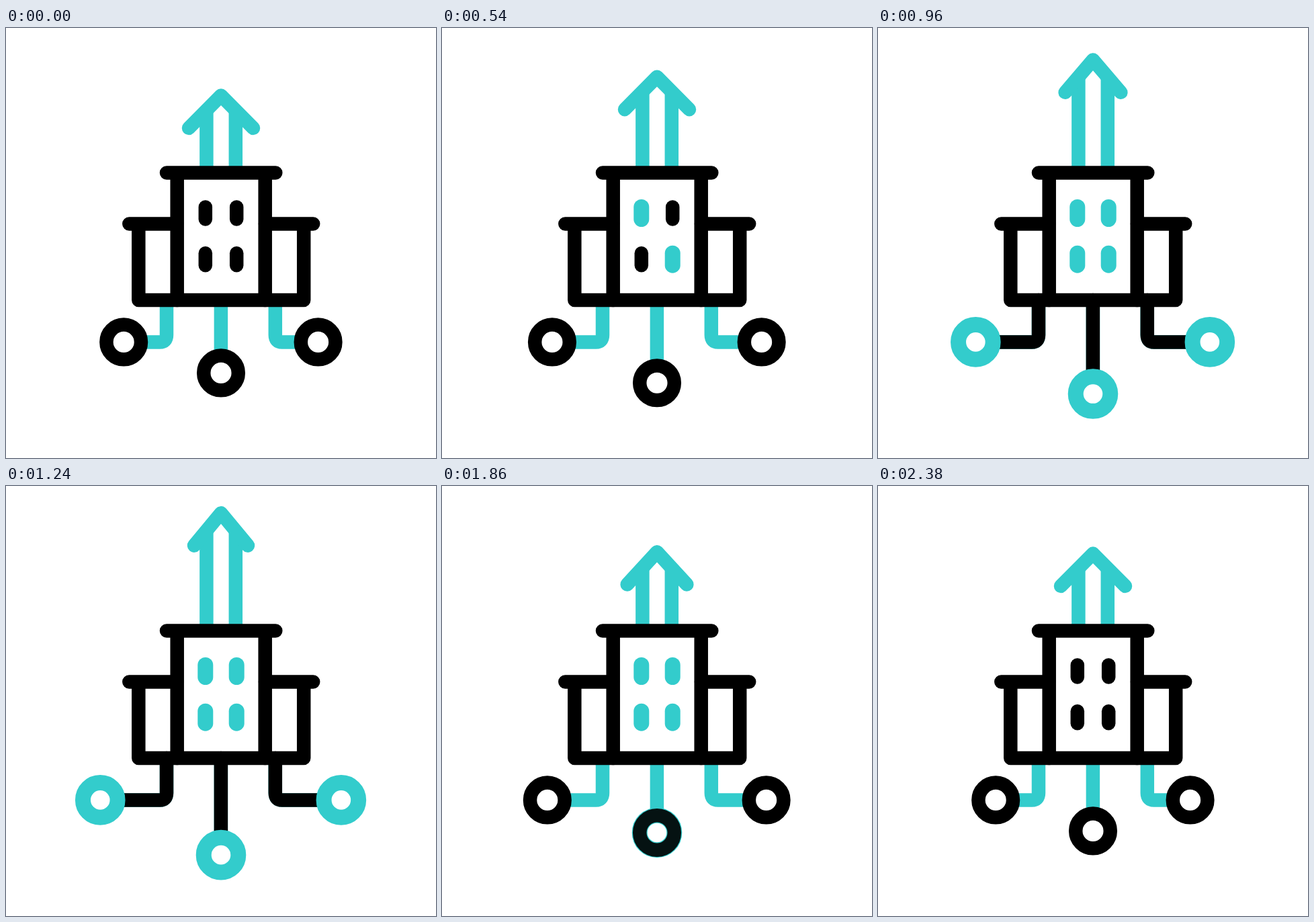
Recreate the animation shown at these times as an HTML page with a canvas. Size 640 by 640 pixels, loop 2.8 s.

```html
<!DOCTYPE html>
<html lang="en">
<head>
<meta charset="utf-8">
<title>Growing building</title>
<style>
html, body { margin: 0; width: 100%; height: 100%; overflow: hidden; background: #fff; }
canvas { display: block; width: 640px; height: 640px; }
</style>
</head>
<body>
<canvas id="stage" width="640" height="640"></canvas>
<script>
const ctx = document.getElementById('stage').getContext('2d');
const LOOP = 2800, REST = 2380, TEAL = '#33cccc', BLACK = '#000', WIDTH = 20.5;

const ramp = (t, from, to) => Math.min(1, Math.max(0, (t - from) / (to - from)));
const ease = (t, from, to) => (1 - Math.cos(Math.PI * ramp(t, from, to))) / 2;

// Soft rise, then a fall just past rest, one rebound and a settle
function stretch(t, power, time, fall, low) {
  const rise = 1 - Math.exp(-((t / time) ** power));
  const top = low + 180;
  return rise - 1.03 * ease(t, fall, low) + 0.243 * ease(t, low, top) - 0.213 * ease(t, top, REST);
}

function stroke(path, color, width = WIDTH, cap = 'round') {
  ctx.strokeStyle = color;
  ctx.lineWidth = width;
  ctx.lineCap = cap;
  ctx.lineJoin = 'round';
  ctx.stroke(new Path2D(path));
}

function drawArrow(t) {
  const tip = 100.6 - 63.3 * stretch(t, 2, 712, 1641, 1905);
  const half = 48 - 8 * (ease(t, 540, 1120) - Math.sqrt(ramp(t, 1640, REST)));
  stroke(`M298.4 ${tip + 24}V215M341.8 ${tip + 24}V215`, TEAL, WIDTH, 'butt');
  stroke(`M${320 - half} ${tip + 48.3}L320 ${tip}L${320 + half} ${tip + 48.3}`, TEAL);
}

function drawPipe(path, length, t) {
  stroke(path, TEAL, WIDTH, 'butt');
  const start = length * ramp(t, 1634, 1834), end = length * ramp(t, 560, 860);
  if (end <= start) return;
  ctx.setLineDash([end - start, 2 * length]);
  ctx.lineDashOffset = -start;
  stroke(path, BLACK);
  ctx.setLineDash([]);
}

function drawNode(x, y, dark) {
  const circle = new Path2D();
  circle.arc(x, y, 25.8, 0, 2 * Math.PI);
  ctx.fillStyle = '#fff';
  ctx.fill(circle);
  if (dark < 1) stroke(circle, TEAL, 23);
  ctx.globalAlpha = dark;
  stroke(circle, BLACK);
  ctx.globalAlpha = 1;
}

function drawSide(t, spread, dark) {
  const x = 175.2 - spread;
  drawPipe(`M239 405V457Q239 467.4 229 467.4H${x}`, 121.8 + spread, t);
  drawNode(x, 467.4, dark);
}

function drawBranches(t) {
  const spread = 36 * stretch(t, 2.7, 778, 1712, 2020);
  const y = 513.4 + 37.3 * stretch(t, 2.2, 735, 1585, 1930);
  const darkness = begin => 1 - ramp(t, 780, 900) + ramp(t, begin, begin + 190);
  drawSide(t, spread, darkness(1661));
  ctx.save();
  ctx.translate(639.8, 0);
  ctx.scale(-1, 1);
  drawSide(t, spread * 0.98, darkness(1661));
  ctx.restore();
  drawPipe(`M319.9 405V${y}`, y - 405, t);
  drawNode(320, y, darkness(1688));
}

function drawWindow(x, y, lit) {
  stroke(`M${x} ${y - 9}V${y + 9}`, lit ? TEAL : BLACK, lit ? 23 : WIDTH);
}

function drawBuilding(t) {
  stroke('M239 215.5H401.3M254.7 215.5V405M385.7 215.5V405', BLACK);
  stroke('M183.3 291.5H254M386 291.5H457.2M197.3 291.5V405H443.2V291.5', BLACK);
  const first = t >= 400 && t < 2180, second = t >= 700 && t < 1900;
  drawWindow(296.8, 275.5, first);
  drawWindow(343.2, 344.2, first);
  drawWindow(343.2, 275.5, second);
  drawWindow(296.8, 344.2, second);
}

function frame() {
  const t = performance.now() % LOOP;
  ctx.fillStyle = '#fff';
  ctx.fillRect(0, 0, 640, 640);
  drawArrow(t);
  drawBranches(t);
  drawBuilding(t);
  requestAnimationFrame(frame);
}
frame();
</script>
</body>
</html>
```
